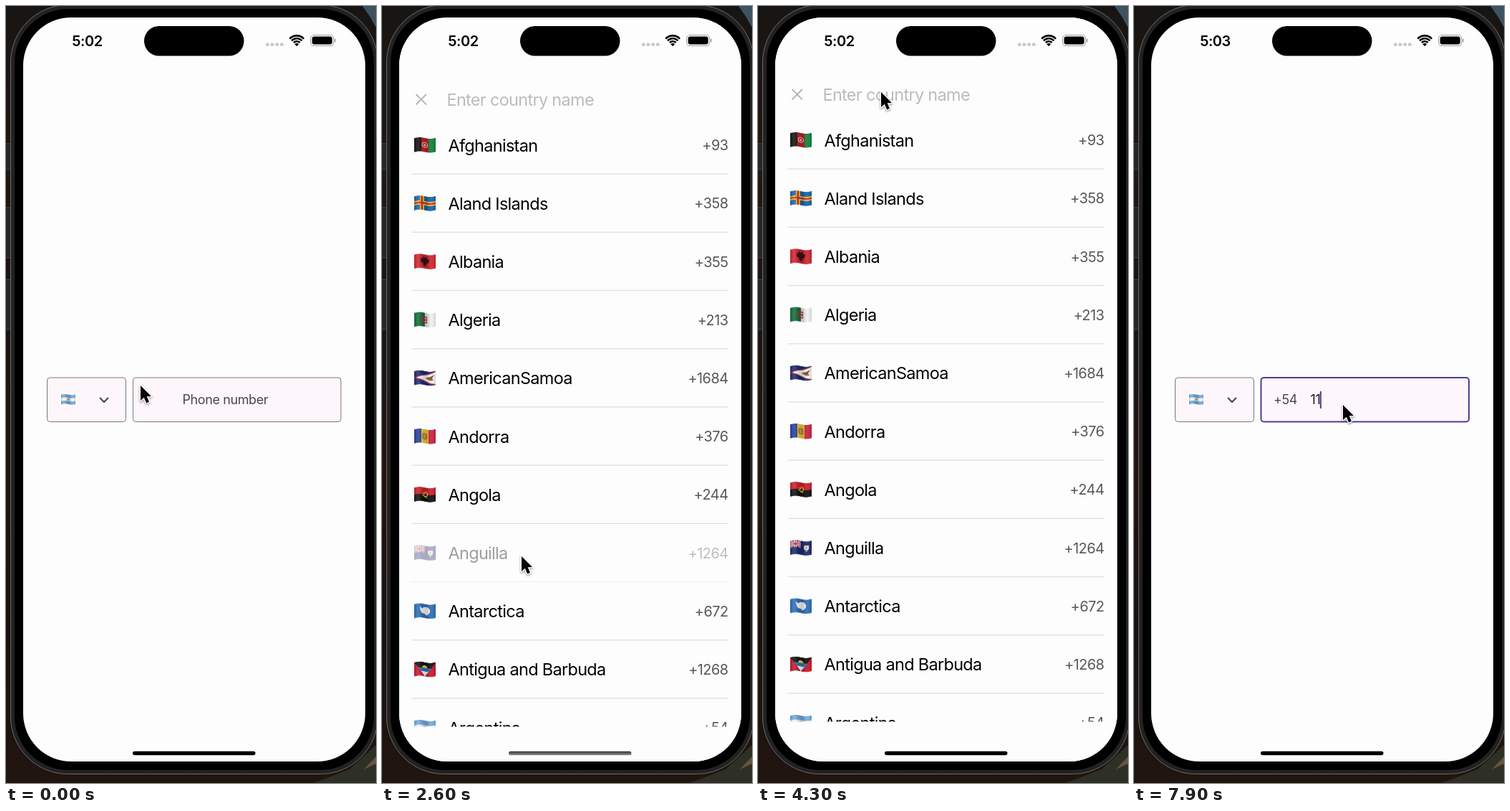
These frames come from a looping animation (517 by 1083 pixels, 8000 ms). An HTML page with a canvas:

```html
<!DOCTYPE html>
<html lang="en">
<head>
<meta charset="utf-8">
<title>Country picker</title>
<style>
  html, body { margin: 0; width: 100%; height: 100%; overflow: hidden; background: #120e0c; }
  canvas { display: block; }
</style>
</head>
<body>
<canvas id="stage" width="517" height="1083"></canvas>
<script>
const ctx = document.getElementById('stage').getContext('2d');
const LOOP = 8000, STEP = 100, ROW = 81.2;
const PAPER = '#fdfdfd', PURPLE = '#4f3f8f';

// Eased keyframes: each key is [time, ...values]
function track(t, keys) {
  let i = 0;
  while (i < keys.length - 1 && keys[i + 1][0] <= t) i++;
  const a = keys[i], b = keys[i + 1] || a;
  const k = b === a ? 0 : Math.max(0, (t - a[0]) / (b[0] - a[0]));
  const e = k * k * (3 - 2 * k);
  return a.slice(1).map((v, n) => v + (b[n + 1] - v) * e);
}

const pointerKeys = [
  [0, 188, 529], [900, 188, 529], [1450, 134, 546], [1750, 134, 546], [2300, 195, 760],
  [2500, 195, 760], [2600, 195, 767], [2850, 195, 800], [3400, 185, 361], [3500, 185, 361],
  [3700, 185, 415], [3800, 185, 421], [4200, 172, 120], [4600, 172, 120], [5300, 161, 187],
  [5900, 161, 187], [6800, 292, 556]
];
const sheetKeys = [
  [1700, 1067], [2300, 0], [2500, 0], [2600, 7], [2850, 40], [3100, 0],
  [3500, 0], [3700, 54], [3800, 60], [4050, 0], [5800, 0], [6250, 1067]
];
// Latest entry whose time has passed
const latest = (t, steps) => steps.reduce((v, [at, s]) => t >= at ? s : v, '');

/* ---------- drawing helpers ---------- */
function box(x, y, w, h, r, fill, stroke, line = 1, c = ctx) {
  c.beginPath();
  c.roundRect(x, y, w, h, r);
  if (fill) { c.fillStyle = fill; c.fill(); }
  if (stroke) { c.strokeStyle = stroke; c.lineWidth = line; c.stroke(); }
}
function poly(c, color, ...p) {
  c.beginPath();
  for (let i = 0; i < p.length; i += 2) c.lineTo(p[i], p[i + 1]);
  c.closePath();
  c.fillStyle = color;
  c.fill();
}
function dot(c, color, x, y, r) {
  c.beginPath();
  c.arc(x, y, r, 0, 7);
  c.fillStyle = color;
  c.fill();
}
function arc(c, color, x, y, r, from, to, line) {
  c.beginPath();
  c.arc(x, y, r, from, to);
  c.strokeStyle = color;
  c.lineWidth = line;
  c.stroke();
}
function lines(color, width, ...segments) {
  ctx.beginPath();
  for (const [x1, y1, ...rest] of segments) {
    ctx.moveTo(x1, y1);
    for (let i = 0; i < rest.length; i += 2) ctx.lineTo(rest[i], rest[i + 1]);
  }
  ctx.strokeStyle = color;
  ctx.lineWidth = width;
  ctx.stroke();
}
function text(s, x, y, size, color, spacing, align = 'left', weight = 400) {
  ctx.font = `${weight} ${size}px Inter, sans-serif`;
  ctx.letterSpacing = spacing + 'px';
  ctx.textAlign = align;
  ctx.fillStyle = color;
  ctx.fillText(s, x, y);
  return ctx.measureText(s).width;
}

/* ---------- flags, on a 30 x 20 field ---------- */
const rect = (c, color, x, y, w, h) => { c.fillStyle = color; c.fillRect(x, y, w, h); };
const bars = (c, ...colors) => colors.forEach((k, i) => rect(c, k, i * 30 / colors.length, 0, 31, 20));
const bands = (c, ...colors) => colors.forEach((k, i) => rect(c, k, 0, i * 20 / colors.length, 30, 21));
function cross(c, color, x, y, width) {
  rect(c, color, x - width / 2, 0, width, 20);
  rect(c, color, 0, y - width / 2, 30, width);
}
function unionCorner(c) {
  c.save();
  c.beginPath(); c.rect(0, 0, 15, 10); c.clip();
  for (const [color, w] of [['#fff', 2.4], ['#c8203a', 0.9]]) {
    c.strokeStyle = color; c.lineWidth = w;
    c.beginPath();
    c.moveTo(0, 0); c.lineTo(15, 10); c.moveTo(15, 0); c.lineTo(0, 10);
    c.stroke();
    const v = w * 1.4;
    rect(c, color, 7.5 - v / 2, 0, v, 10);
    rect(c, color, 0, 5 - v / 2, 15, v);
  }
  c.restore();
}

const flagArt = {
  Afghanistan(c) {
    bars(c, '#111', '#c31f26', '#14823a');
    arc(c, '#f3d8d0', 15, 10, 3.6, 0, 7, 1);
    dot(c, '#eec3b8', 15, 10.3, 1.7);
  },
  'Aland Islands'(c) {
    rect(c, '#1766ac', 0, 0, 30, 20);
    cross(c, '#f8cb2e', 11, 10, 6);
    cross(c, '#d02c35', 11, 10, 2.6);
  },
  Albania(c) {
    rect(c, '#d22630', 0, 0, 30, 20);
    poly(c, '#351016', 15, 5, 13, 3, 11.5, 4.5, 13, 6.5, 8.5, 6, 10, 12, 13, 12, 12.5, 14.5, 15, 17,
      17.5, 14.5, 17, 12, 20, 12, 21.5, 6, 17, 6.5, 18.5, 4.5, 17, 3);
  },
  Algeria(c) {
    bars(c, '#12703c', '#f1f1f1');
    arc(c, '#cf2136', 15, 10, 4.2, 0.7, 5.6, 1.7);
    dot(c, '#cf2136', 16.8, 10, 1.6);
  },
  AmericanSamoa(c) {
    rect(c, '#202b70', 0, 0, 30, 20);
    poly(c, '#c02c3f', 0, 10, 30, 0, 30, 20);
    poly(c, '#f7f7f7', 3, 10, 30, 1.3, 30, 18.7);
    poly(c, '#7c4b2c', 16, 10, 21, 8, 28, 5, 25, 10, 27, 13, 21, 12);
    poly(c, '#d9a640', 19, 13, 25, 12, 25, 13.5);
  },
  Andorra(c) {
    bars(c, '#2542a0', '#f3ce3b', '#cb2440');
    box(12, 6, 6, 8, 2, '#c98e46', '#a8673b', 0.9, c);
    rect(c, '#dfb44d', 14.5, 7, 1, 6);
  },
  Angola(c) {
    bands(c, '#cf1f2c', '#111');
    arc(c, '#f3cf35', 15, 9.5, 3.6, -1.5, 1.9, 1.3);
    poly(c, '#f3cf35', 11, 11, 12, 10, 18.5, 14, 18, 15);
    dot(c, '#f3cf35', 14, 8.5, 1.2);
  },
  Anguilla(c) {
    rect(c, '#202a6d', 0, 0, 30, 20);
    unionCorner(c);
    poly(c, '#f4f1e8', 19.5, 6, 26, 6, 26, 11, 22.8, 15, 19.5, 11);
    dot(c, '#d79b43', 22.8, 9, 1.7);
    poly(c, '#69aec1', 20, 11.7, 25.5, 11.7, 22.8, 14.5);
  },
  Antarctica(c) {
    rect(c, '#2e70b8', 0, 0, 30, 20);
    poly(c, '#fafafa', 8, 4, 11, 7, 14, 4.5, 19, 4, 22, 7, 22, 11, 20, 14, 17, 16, 15, 14, 11, 13.5, 9, 10);
  },
  'Antigua and Barbuda'(c) {
    rect(c, '#c9192e', 0, 0, 30, 20);
    poly(c, '#111', 0, 0, 30, 0, 15, 20);
    dot(c, '#f5cf39', 15, 8, 3.7);
    poly(c, '#2b75bd', 6, 8, 24, 8, 20.2, 13, 9.8, 13);
    poly(c, '#fff', 9.8, 13, 20.2, 13, 15, 20);
  },
  Argentina(c) {
    bands(c, '#75aee0', '#f8f8f8', '#75aee0');
    dot(c, '#c89e50', 15, 10, 2.2);
  },
  Armenia(c) { bands(c, '#d32032', '#2944a0', '#efab2c'); },
  Aruba(c) {
    rect(c, '#4b91d9', 0, 0, 30, 20);
    rect(c, '#f6d748', 0, 13, 30, 1.2);
    rect(c, '#f6d748', 0, 15.5, 30, 1.2);
    dot(c, '#ce2d3a', 5, 5, 2);
  }
};

const SCALE = 4;
function layer(w, h) {
  const canvas = document.createElement('canvas');
  canvas.width = w * SCALE;
  canvas.height = h * SCALE;
  return canvas;
}
// Draws the flat flag, then shifts its columns into a shaded wave
function waveFlag(art) {
  const flat = layer(30, 20), waved = layer(30, 24);
  const f = flat.getContext('2d'), w = waved.getContext('2d');
  f.scale(SCALE, SCALE);
  art(f);
  for (let x = 0; x < flat.width; x++) {
    const u = x / flat.width;
    w.drawImage(flat, x, 0, 1, 80, x, 9 - 4.5 * Math.sin(2 * Math.PI * u) - 2 * u, 1, 78);
  }
  const shade = w.createLinearGradient(0, 0, flat.width, 0);
  ['#0003', '#fff2', '#0002', '#0003', '#fff1', '#0002'].forEach((k, i) => shade.addColorStop(i / 5, k));
  w.globalCompositeOperation = 'source-atop';
  w.fillStyle = shade;
  w.fillRect(0, 0, 120, 96);
  return waved;
}
const flags = {};
for (const name in flagArt) flags[name] = waveFlag(flagArt[name]);

function flag(name, x, y, scale = 1) {
  ctx.drawImage(flags[name], x - 15.2 * scale, y - 12 * scale, 30.4 * scale, 24 * scale);
}

/* ---------- scene parts ---------- */
const codes = [93, 358, 355, 213, 1684, 376, 244, 1264, 672, 1268, 54, 374, 297];
const countries = Object.keys(flagArt).map((name, i) => ({ name, code: '+' + codes[i] }));

function wallpaper() {
  const g = ctx.createLinearGradient(0, 0, 0, 1083);
  ['#171513', '#211713', '#1a1512', '#24150f', '#19100d', '#211510']
    .forEach((k, i) => g.addColorStop(i / 5, k));
  rect(ctx, g, 0, 0, 517, 1083);
  poly(ctx, '#3d5361', 498, 0, 517, 0, 517, 30, 508, 14);
  poly(ctx, '#2e3026', 430, 1083, 480, 1064, 517, 1030, 517, 1083);
  poly(ctx, '#665441', 500, 1064, 517, 1046, 517, 1056);
}

function phone() {
  for (const [y, h] of [[192, 36], [281, 70], [381, 70]]) box(-4, y, 11, h, 2, '#262627', '#454546');
  box(6.5, -1.5, 513, 1072, 80, '#222223', '#6a6a6b');
  box(12, 4, 502, 1061, 75, '#000');
  box(24, 16, 478, 1037, 67, PAPER);
}

function statusBar(t) {
  text(t < 6700 ? '5:02' : '5:03', 113.5, 55.5, 20, '#000', -0.5, 'center', 600);
  box(193, 28, 139.5, 41.5, 20.7, '#000');
  for (let i = 0; i < 4; i++) box(363 + i * 6.7, 51.5, 4.6, 4.2, 1.5, '#c6c6c8');
  for (const r of [5.8, 9.8, 13.6]) arc(ctx, '#000', 406.3, 55, r, -Math.PI * 0.76, -Math.PI * 0.24, 2.6);
  poly(ctx, '#000', 406.3, 56.3, 403.2, 53, 406.3, 51.7, 409.4, 53);
  box(425.7, 40.5, 32, 15, 4.6, null, '#a0a0a2', 1.1);
  box(427.7, 42.5, 28, 11, 3, '#000');
  box(459, 45.5, 1.6, 5, 0.8, '#a0a0a2');
}

function homeBar(t) {
  let fill = '#000';
  if (t >= 2400 && t < 2800) {
    fill = ctx.createLinearGradient(0, 1039, 0, 1044.5);
    fill.addColorStop(0, '#3c3c3c');
    fill.addColorStop(1, '#8c8c8c');
  }
  box(177, 1038.7, 171.5, 5.6, 2.8, fill);
}

function form(t) {
  const focused = t >= 7000;
  box(57.5, 518, 110, 61.5, 4, '#fdf7fb', '#79747e');
  box(177.5, 518, 290.5, 61.5, 4, '#fdf7fb', focused ? PURPLE : '#79747e', focused ? 2 : 1);
  flag('Argentina', 87, 548.5, 0.69);
  if (t >= 1500 && t < 2400) rect(ctx, PURPLE, 104, 536.5, 2, 24);
  if (t >= 1500 && t < 1900) dot(ctx, '#dedde1', 137, 549, 22.3);
  lines('#49454f', 2.2, [131, 546, 137, 552, 143, 546]);
  if (!focused) {
    text('Phone number', 246.5, 555.3, 18, '#49454f', -0.4);
    return;
  }
  text('+54', 195, 555.3, 18, '#49454f', -0.4);
  const typed = latest(t, [[7300, '1'], [7600, '11']]);
  const w = text(typed, 246.5, 555.3, 18, '#1d1b20', -0.4);
  rect(ctx, PURPLE, 246 + w, 537, 2, 24);
}

function countryRow({ name, code }, y, pressed) {
  ctx.globalAlpha = pressed ? 0.38 : 1;
  flag(name, 59.8, y);
  text(name, 92.5, y + 8.6, 23.5, '#000', -0.7);
  text(code, 483.5, y + 7.2, 20, '#58585b', -0.6, 'right');
  rect(ctx, '#e0e0e1', 41.5, y + 39.5, 442.5, 1.3);
  ctx.globalAlpha = 1;
}

function sheet(t) {
  if (t < 1700 || t >= 6250) return;
  ctx.save();
  ctx.beginPath(); ctx.roundRect(24, 16, 478, 1037, 67); ctx.clip();
  ctx.translate(0, track(t, sheetKeys)[0]);
  rect(ctx, PAPER, 24, 16, 478, 1040);
  lines('#b4b4b6', 1.8, [47.5, 116, 62, 130.5], [62, 116, 47.5, 130.5]);

  const query = latest(t, [[4800, 'A'], [5000, 'Ar'], [5200, 'Arg']]);
  const w = query ? text(query, 90.5, 132, 23.5, '#000', -0.7) : 0;
  if (!query) text('Enter country name', 90.5, 132, 23.5, '#bcbcbe', -0.7);
  if (t >= 4500) rect(ctx, '#4a5cc2', 90.5 + w, 109, 2, 29);

  ctx.beginPath(); ctx.rect(24, 150, 478, 847.5); ctx.clip();
  const pressed = t >= 2500 && t < 2800 ? 'Anguilla' : t >= 5600 && t < 5800 ? 'Argentina' : '';
  countries.filter(c => c.name.startsWith(query))
    .forEach((c, i) => countryRow(c, 187 + i * ROW, c.name === pressed));
  ctx.restore();
}

function pointer(t) {
  ctx.save();
  ctx.translate(...track(t, pointerKeys));
  ctx.beginPath();
  for (const [x, y] of [[0, 0], [0, 21], [4.8, 16.8], [8.2, 24.4], [12, 22.7], [8.7, 15.3], [15, 15]]) ctx.lineTo(x, y);
  ctx.closePath();
  ctx.shadowColor = '#0006';
  ctx.shadowBlur = 3;
  ctx.shadowOffsetY = 1.5;
  ctx.strokeStyle = '#fff';
  ctx.lineWidth = 2.6;
  ctx.lineJoin = 'round';
  ctx.stroke();
  ctx.shadowColor = 'transparent';
  ctx.fillStyle = '#000';
  ctx.fill();
  ctx.restore();
}

function draw(t) {
  ctx.imageSmoothingQuality = 'high';
  wallpaper();
  phone();
  form(t);
  sheet(t);
  statusBar(t);
  homeBar(t);
  pointer(t);
}

const start = performance.now();
function frame() {
  const t = (performance.now() - start) % LOOP;
  draw(Math.floor(t / STEP) * STEP);
  requestAnimationFrame(frame);
}
frame();
</script>
</body>
</html>
```
